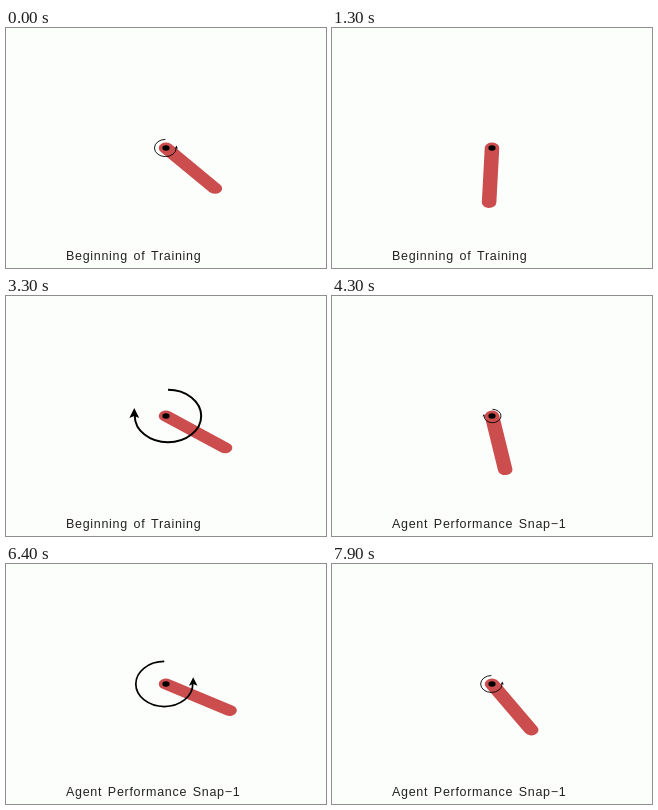
Recreate the animation shown at these times as an HTML page with a canvas. Size 320x240 px, loop 8000 ms.

```html
<!DOCTYPE html>
<html lang="en">
<head>
<meta charset="utf-8">
<title>Pendulum training</title>
<style>
  html, body { margin: 0; width: 320px; height: 240px; overflow: hidden; background: #fcfefc; }
  canvas { display: block; }
</style>
</head>
<body>
<canvas id="stage" width="320" height="240"></canvas>
<script>
const ctx = document.getElementById('stage').getContext('2d');
const STEP = 100, STEPS = 80, RESET = 40;
const UNIT_X = 320 / 4.4, UNIT_Y = 240 / 4.4;
const { sin, cos, exp, abs, max, floor, PI } = Math;

// Angles are measured from straight down, positive to the right; torque is -1 to 1.

// Untrained: a steady swing, with a torque that ignores its rhythm.
function untrained(n) {
  const phase = 2 * PI * (n - 10) / 11.2;
  return {
    label: 'Beginning of Training',
    angle: .06 + (.865 + .0023 * n) * cos(phase),
    torque: cos(.7 * n - 1.24)
  };
}

// Trained: the swing grows while the torque falls into step with it.
function trained(n) {
  const phase = 2 * PI * (n - .7) / 12;
  return {
    label: 'Agent Performance Snap\u22121',
    angle: (.42 + .03 * n) * cos(phase),
    torque: .9 * cos(phase + exp(-n / 7))
  };
}

function drawRod(angle) {
  ctx.save();
  ctx.scale(UNIT_X, UNIT_Y);
  ctx.strokeStyle = '#cc4d4d';
  ctx.lineWidth = .2;
  ctx.lineCap = 'round';
  ctx.beginPath();
  ctx.moveTo(0, 0);
  ctx.lineTo(sin(angle), cos(angle));
  ctx.stroke();
  ctx.beginPath();
  ctx.arc(0, 0, .05, 0, 2 * PI);
  ctx.fill();
  ctx.restore();
}

function drawTorque(torque) {
  const size = abs(torque);
  if (size < .04) return;
  ctx.save();
  ctx.scale(-torque, size);
  ctx.lineWidth = max(2, .9 / size);
  ctx.beginPath();
  ctx.ellipse(2, 0, 33.5, 26.5, 0, -PI / 2, PI);
  ctx.stroke();
  ctx.beginPath();
  ctx.moveTo(-32, -8);
  ctx.lineTo(-27, 2);
  ctx.lineTo(-32, 0);
  ctx.lineTo(-37, 2);
  ctx.fill();
  ctx.restore();
}

function draw(now) {
  const n = floor(now / STEP) % STEPS;
  const { label, angle, torque } = n < RESET ? untrained(n) : trained(n - RESET);
  ctx.fillStyle = '#fcfefc';
  ctx.fillRect(0, 0, 320, 240);
  ctx.fillStyle = '#222';
  ctx.font = '12.5px "Liberation Sans", Arial, sans-serif';
  ctx.letterSpacing = '.7px';
  ctx.wordSpacing = '1.5px';
  ctx.fillText(label, 60, 232);
  ctx.fillStyle = ctx.strokeStyle = '#000';
  ctx.save();
  ctx.translate(160, 120);
  drawRod(angle);
  drawTorque(torque);
  ctx.restore();
}

const start = performance.now();
function tick() {
  draw(performance.now() - start);
  requestAnimationFrame(tick);
}
tick();
</script>
</body>
</html>
```
